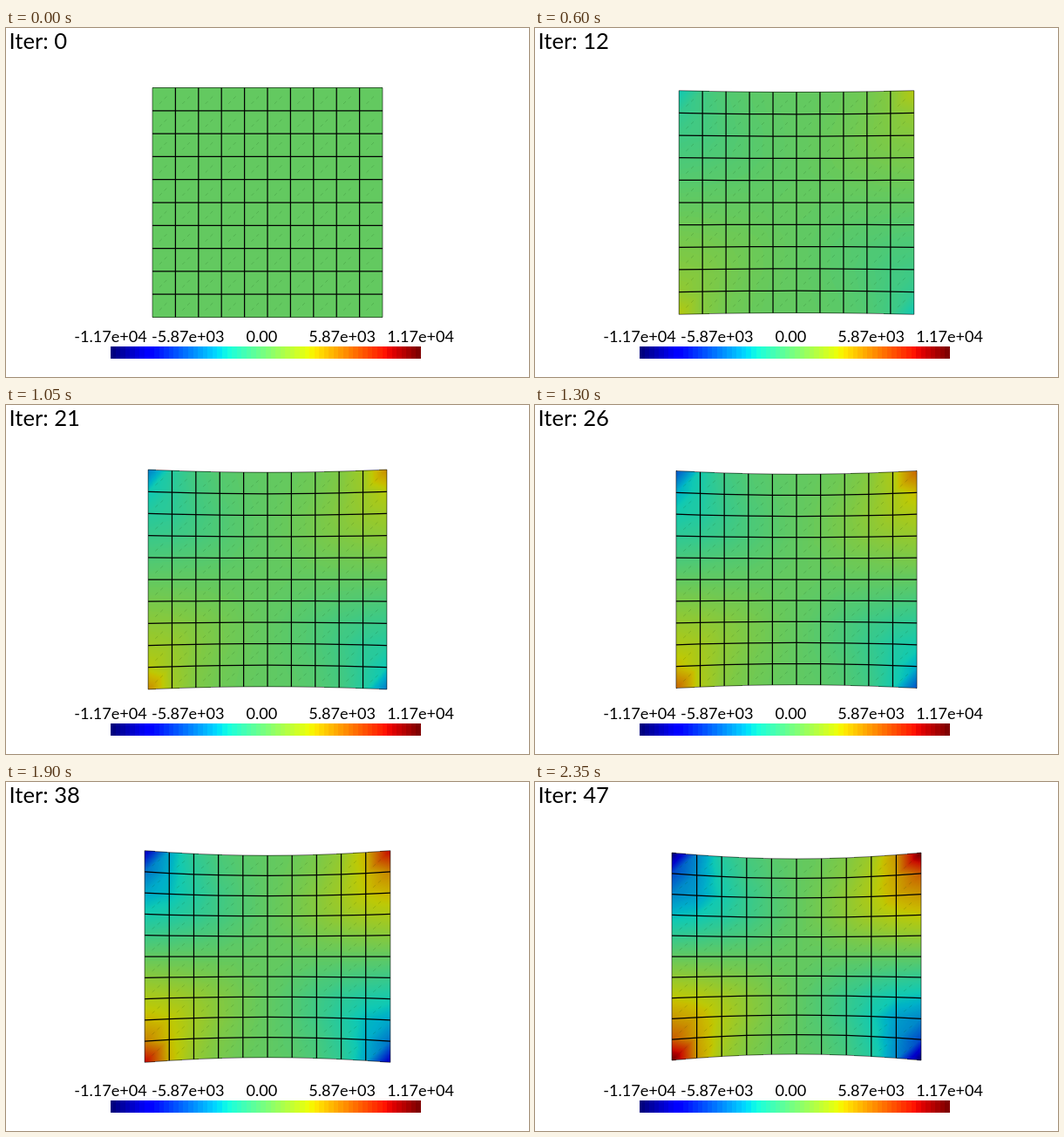
Recreate the animation shown at these times as an HTML page with a canvas. Size 600 by 400 pixels, loop 2.4 s.

```html
<!DOCTYPE html>
<html lang="en">
<head>
<meta charset="utf-8">
<title>Shear stress in a stretched plate</title>
<style>
  html, body { margin: 0; width: 100%; height: 100%; overflow: hidden; background: #fff; }
  canvas, svg { position: absolute; left: 0; top: 0; width: 600px; height: 400px; }
  text { font-family: Lato, "Open Sans", sans-serif; fill: #000; }
  #iter { font-size: 25.6px; }
  #labels { font-size: 18.1px; text-anchor: middle; }
</style>
</head>
<body>
<canvas id="plate" width="600" height="400"></canvas>
<svg viewBox="0 0 600 400">
  <text id="iter" x="3.5" y="24">Iter: 0</text>
  <g id="bar" shape-rendering="crispEdges"></g>
  <g id="labels">
    <text x="120" y="360">-1.17e+04</text>
    <text x="208.7" y="360">-5.87e+03</text>
    <text x="293.5" y="360">0.00</text>
    <text x="385.7" y="360">5.87e+03</text>
    <text x="475.7" y="360">1.17e+04</text>
  </g>
</svg>
<script>
const STEPS = 48, STEP_MS = 50, N = 10, CX = 300, CY = 200, SHADE = 0.79;

// Relative shear at the nodes of the top left quarter, row by row from the corner.
const QUARTER = [
  [1, .42, .19, .09, .03, 0],
  [.58, .39, .22, .11, .045, 0],
  [.42, .36, .24, .14, .06, 0],
  [.29, .26, .20, .13, .06, 0],
  [.15, .13, .10, .07, .03, 0],
  [0, 0, 0, 0, 0, 0]
];

const fold = k => Math.min(k, N - k);
const shear = (col, row) =>
  -Math.sign(N / 2 - col) * Math.sign(N / 2 - row) * QUARTER[fold(row)][fold(col)];
const nodes = Array.from({ length: N + 1 }, (_, row) =>
  Array.from({ length: N + 1 }, (_, col) => shear(col, row)));

// Piecewise linear curve through [position, value] points.
function ramp(points, x) {
  const k = Math.max(1, points.findIndex(p => p[0] >= x));
  const [x0, y0] = points[k - 1], [x1, y1] = points[k];
  return y0 + (y1 - y0) * (x - x0) / (x1 - x0);
}

const JET = [
  [[0, 0], [.35, 0], [.66, 1], [.89, 1], [1, .5]],
  [[0, 0], [.125, 0], [.375, 1], [.64, 1], [.91, 0], [1, 0]],
  [[0, .5], [.11, 1], [.34, 1], [.65, 0], [1, 0]]
];
const jet = x => JET.map(channel => Math.round(255 * ramp(channel, x)));
const palette = Array.from({ length: 256 }, (_, k) => jet(k / 255).map(c => c * SHADE));

const ctx = document.getElementById('plate').getContext('2d');
const iter = document.getElementById('iter');

function buildBar() {
  const count = 64, width = 356 / count;
  let rects = '';
  for (let k = 0; k < count; k++) {
    rects += `<rect x="${120 + k * width}" y="365" width="${width}" height="14" fill="rgb(${jet(k / (count - 1))})"/>`;
  }
  document.getElementById('bar').innerHTML = rects;
}

const halfWidth = p => 132 + 11 * p;
const halfHeight = (p, x) => 131.5 - p * (19.5 - 7 * x * x);

// Linear interpolation over the two triangles of a cell.
function sample(gx, gy) {
  const col = Math.min(N - 1, Math.floor(gx)), row = Math.min(N - 1, Math.floor(gy));
  const u = gx - col, v = gy - row;
  const tr = nodes[row][col + 1], bl = nodes[row + 1][col];
  if (u + v < 1) {
    const tl = nodes[row][col];
    return tl + u * (tr - tl) + v * (bl - tl);
  }
  const br = nodes[row + 1][col + 1];
  return br + (1 - u) * (bl - br) + (1 - v) * (tr - br);
}

function fillPlate(p) {
  const w = halfWidth(p), left = Math.round(CX - w), right = Math.round(CX + w);
  const top = 60, img = ctx.createImageData(right - left, 280);
  for (let px = 0; px < img.width; px++) {
    const x = (left + px + .5 - CX) / w, h = halfHeight(p, x);
    const gx = Math.min(N, Math.max(0, (x + 1) * N / 2));
    for (let py = 0; py < img.height; py++) {
      const y = (top + py + .5 - CY) / h;
      if (Math.abs(y) > 1) continue;
      const value = p * sample(gx, (y + 1) * N / 2);
      const rgb = palette[Math.round((value + 1) * 127.5)];
      img.data.set([rgb[0], rgb[1], rgb[2], 255], 4 * (py * img.width + px));
    }
  }
  ctx.putImageData(img, left, top);
}

function drawEdges(p) {
  const w = halfWidth(p);
  const place = (x, y) => [CX + w * x, CY + halfHeight(p, x) * y];
  const line = (points, width, color) => {
    ctx.beginPath();
    points.forEach(q => ctx.lineTo(...place(...q)));
    ctx.lineWidth = width;
    ctx.strokeStyle = color;
    ctx.stroke();
  };

  // Faint traces of the triangle diagonals.
  ctx.setLineDash([4, 4]);
  for (let row = 0; row < N; row++) {
    for (let col = 0; col < N; col++) {
      const at = (u, v) => [(col + u) / 5 - 1, (row + v) / 5 - 1];
      line([at(.3, .7), at(.7, .3)], .8, 'rgba(0,50,0,.2)');
    }
  }
  ctx.setLineDash([]);

  for (let k = 0; k <= N; k++) {
    const s = k / 5 - 1, rim = k % N === 0;
    const width = rim ? .8 : 1.25, color = rim ? 'rgba(0,0,0,.7)' : '#000';
    line([[s, -1], [s, 1]], width, color);
    line(Array.from({ length: N + 1 }, (_, j) => [j / 5 - 1, s]), width, color);
  }
}

let shown = -1;
function tick() {
  const step = Math.floor(performance.now() / STEP_MS) % STEPS;
  if (step !== shown) {
    shown = step;
    const p = step / (STEPS - 1);
    ctx.clearRect(0, 0, 600, 400);
    fillPlate(p);
    drawEdges(p);
    iter.textContent = 'Iter: ' + step;
  }
  requestAnimationFrame(tick);
}

buildBar();
tick();
</script>
</body>
</html>
```
